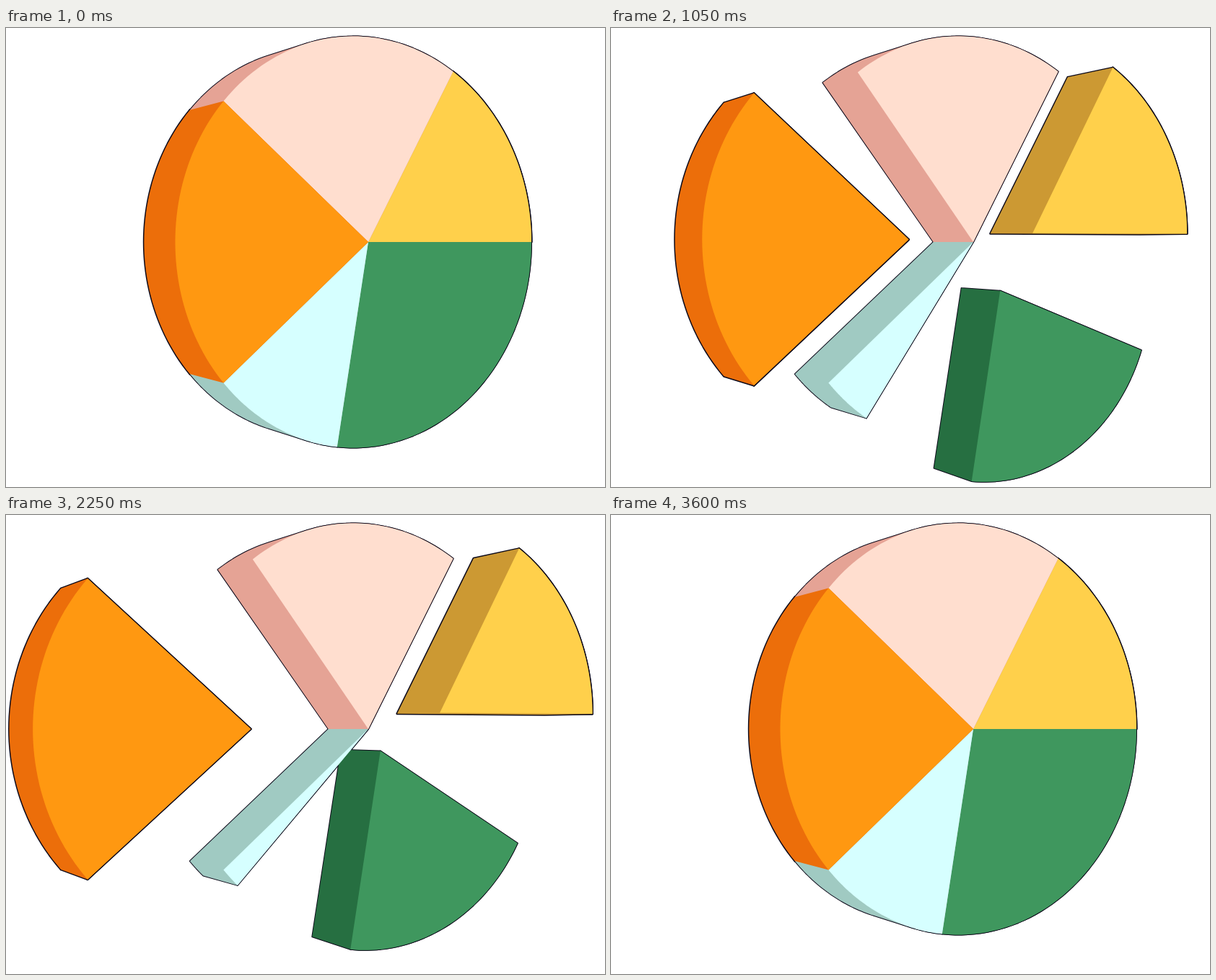
Recreate the animation shown at these times as an HTML page with a canvas. Size 830x637 px, loop 3.63 s.

```html
<!DOCTYPE html>
<html>
<head>
<meta charset="utf-8">
<style>
  html, body { margin: 0; width: 830px; height: 637px; overflow: hidden; background: #fff; }
  canvas { display: block; }
</style>
</head>
<body>
<canvas id="stage" width="830" height="637"></canvas>
<script>
const ctx = document.getElementById('stage').getContext('2d');
const LOOP = 3630, CYCLE = 3600, STEP = 30;

// Perspective of the tilted disc: u across, v down, w from front (0) to back (1).
function project(u, v, w, [px, py, ps]) {
  const depth = 1 + 0.0842 * u + 0.062 * w + ps;
  return [502 + (245 * u - 58.8 * w + px) / depth, 297 + (284.5 * v + py) / depth];
}

// Smooth track through [time, value] keys, flat at peaks and ends.
function track(keys) {
  const slope = i => {
    if (i === 0 || i === keys.length - 1) return 0;
    const [[t0, a], [t1, b], [t2, c]] = keys.slice(i - 1, i + 2);
    return (b - a) * (c - b) <= 0 ? 0 : ((b - a) / (t1 - t0) + (c - b) / (t2 - t1)) / 2;
  };
  return t => {
    let i = 0;
    while (i < keys.length - 2 && t > keys[i + 1][0]) i++;
    const [t0, a] = keys[i], [t1, b] = keys[i + 1];
    const h = t1 - t0, x = (t - t0) / h, y = 1 - x;
    return a * y * y * (1 + 2 * x) + b * x * x * (3 - 2 * x)
      + h * x * y * (slope(i) * y - slope(i + 1) * x);
  };
}

const wave = (t, period) => (1 - Math.cos(2 * Math.PI * t / period)) / 2;

const orangeOut = track([[0, 0], [270, .48], [505, .645], [630, .589], [1050, .364], [1590, .065],
  [1750, 0], [2020, .46], [2262, .645], [2730, .39], [3240, .1], [3600, 0]]);
const greenOut = track([[0, 0], [270, 33], [540, 58], [630, 63.3], [920, 76], [1050, 72.9],
  [1590, 55.4], [2250, 31.5], [2730, 15.75], [3240, 5], [3600, 0]]);
const greenCut = track([[0, 0], [630, 9.6], [1050, 20.75], [1590, 36.5], [1800, 39],
  [2250, 30.4], [2730, 40.3], [3600, 0]]);

const REST = [0, 0, 0];

// Back to front; angles in degrees, counter-clockwise.
const slices = [
  { face: '#ffd04b', side: '#cc9933', line: 3, from: 0, to: () => 60,
    move: t => {
      const p = wave(t, CYCLE), u = 0.463 * p ** 0.634;
      return [245 * u, -32.1 * p * p, 0.0842 * u];
    } },
  { face: '#3f975e', side: '#266f41', line: 2, from: 260, to: t => 360 - greenCut(t),
    move: t => { const g = greenOut(t); return [0.55 * g, g, 0.00107 * g]; } },
  { face: '#ffdecf', side: '#e5a395', line: 2, from: 60,
    to: t => 140 - 80 * wave(t, CYCLE / 3), move: () => REST },
  { face: '#d6ffff', side: '#a0cac2', line: 2, from: 220,
    to: t => 260 - 40 * wave(t, CYCLE), move: () => REST },
  { face: '#ff9811', side: '#ec6e0a', line: 3, from: 140, to: () => 220,
    move: t => {
      const d = orangeOut(t);
      return [-237.7 * d, t < 1750 ? -9.1 * d : 0, -0.0919 * d];
    } }
];

// Adds a polygon with a fixed winding so that overlapping parts merge.
function addPolygon(path, points) {
  let area = 0;
  points.forEach(([x, y], i) => {
    const [nx, ny] = points[(i + 1) % points.length];
    area += x * ny - nx * y;
  });
  if (area < 0) points = points.slice().reverse();
  points.forEach(([x, y], i) => i ? path.lineTo(x, y) : path.moveTo(x, y));
  path.closePath();
}

function build(slice, t) {
  const offset = slice.move(t), end = slice.to(t), N = 48;
  const rim = [[0, 0]];
  for (let i = 0; i <= N; i++) {
    const a = (slice.from + (end - slice.from) * i / N) * Math.PI / 180;
    rim.push([Math.cos(a), -Math.sin(a)]);
  }
  const front = rim.map(([u, v]) => project(u, v, 0, offset));
  const back = rim.map(([u, v]) => project(u, v, 1, offset));
  const face = new Path2D(), side = new Path2D();
  addPolygon(face, front);
  addPolygon(side, back);
  front.forEach((p, i) => {
    const j = (i + 1) % front.length;
    addPolygon(side, [p, front[j], back[j], back[i]]);
  });
  return { slice, face, side };
}

function draw(t) {
  ctx.fillStyle = '#fff';
  ctx.fillRect(0, 0, 830, 637);
  const shapes = slices.map(s => build(s, t));
  // All outlines lie below all fills: only the common silhouette keeps a line.
  ctx.strokeStyle = '#0d0a1a';
  ctx.lineJoin = 'round';
  for (const { slice, face, side } of shapes) {
    ctx.lineWidth = slice.line;
    ctx.stroke(side);
    ctx.stroke(face);
  }
  for (const { slice, face, side } of shapes) {
    ctx.fillStyle = slice.side;
    ctx.fill(side);
    ctx.fillStyle = slice.face;
    ctx.fill(face);
  }
}

const start = performance.now();
function tick() {
  const t = (performance.now() - start) % LOOP;
  draw(Math.floor(t / STEP) * STEP);
  requestAnimationFrame(tick);
}
tick();
</script>
</body>
</html>
```
